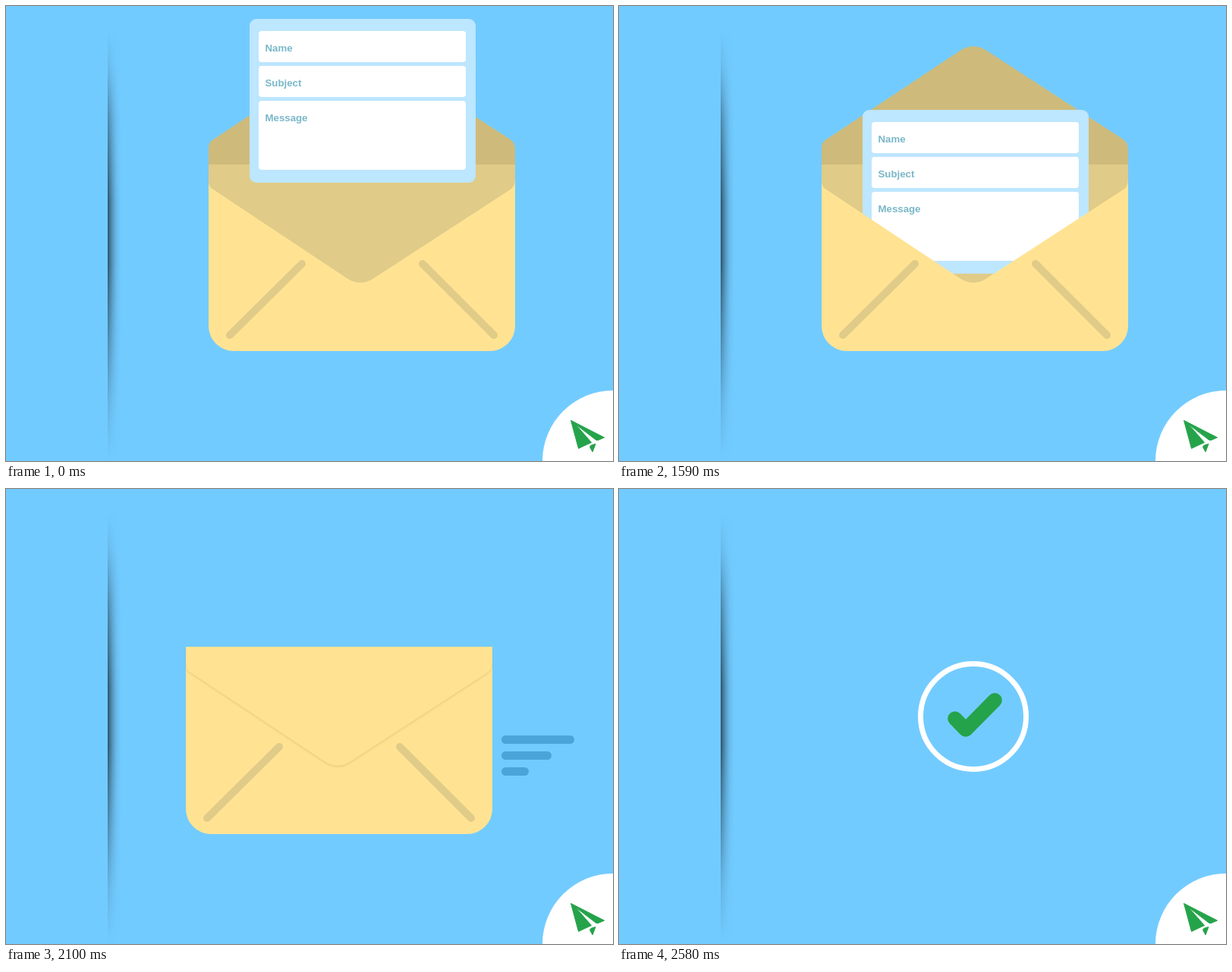
An HTML page that plays this animation: 800 by 600 pixels, repeating every 3080 ms.

```html
<!DOCTYPE html>
<html lang="en">
<head>
<meta charset="utf-8">
<title>Sending a message</title>
<style>
  :root { --sky: #72cbff; --paper: #ffe393; --fold: #e0cb88; --green: #25a34a; }
  html, body { margin: 0; width: 100%; height: 100%; overflow: hidden; background: var(--sky); }
  .stage { position: relative; width: 800px; height: 600px; overflow: hidden; }
  svg { position: absolute; inset: 0; display: block; }

  .anim { animation: 3080ms step-end infinite; }
  .envelope { animation-name: fly; }
  .card { animation-name: drop; }
  .flap { transform-origin: 0 209px; }
  .flap.open { fill: #cebb7b; animation-name: fold; }
  .flap.shut { fill: var(--paper); animation-name: unfold; }
  .streaks { fill: #4ba4d9; animation-name: streak; }
  .done { animation-name: done; }
  .button { animation-name: press; }

  .card text { font: bold 13.25px "Liberation Sans", Arial, sans-serif; fill: #79b7c8; }
  .crease { fill: none; stroke: var(--fold); stroke-width: 10; stroke-linecap: round; }
  .lip { filter: drop-shadow(0 2px 1px rgba(90, 70, 0, .1)); }

  .slot {
    position: absolute; left: 134px; top: 0; width: 20px; height: 600px;
    background: linear-gradient(90deg, rgba(0,0,0,.6), rgba(0,0,0,.42) 3px, rgba(0,0,0,.23) 7px, rgba(0,0,0,.07) 12px, transparent 18px);
    -webkit-mask-image: linear-gradient(transparent 30px, rgba(0,0,0,.14) 80px, rgba(0,0,0,.58) 150px, #000 260px, #000 340px, rgba(0,0,0,.6) 435px, rgba(0,0,0,.2) 525px, transparent 600px);
    mask-image: linear-gradient(transparent 30px, rgba(0,0,0,.14) 80px, rgba(0,0,0,.58) 150px, #000 260px, #000 340px, rgba(0,0,0,.6) 435px, rgba(0,0,0,.2) 525px, transparent 600px);
  }

  @keyframes press {
    0%, 48.7% { fill: #fff; color: var(--green); }
    16.233% { fill: #f3f3f3; color: #1f943f; }
    100% { fill: #fff; color: var(--green); }
  }
  @keyframes drop {
    0% { transform: translateY(0); }
    48.7% { transform: translateY(0); animation-timing-function: steps(12, jump-start); }
    60.389%, 100% { transform: translateY(360px); }
  }
  @keyframes fold {
    0% { transform: scaleY(-1); }
    60.389% { transform: scaleY(-1); animation-timing-function: steps(5, jump-start); }
    65.259%, 100% { transform: scaleY(1); }
  }
  @keyframes unfold {
    0% { transform: scaleY(-1); visibility: hidden; }
    60.389% { transform: scaleY(-1); animation-timing-function: steps(5, jump-start); }
    62.337% { visibility: visible; }
    65.259%, 100% { transform: scaleY(1); visibility: visible; }
  }
  @keyframes streak {
    0% { visibility: hidden; }
    66.233%, 100% { visibility: visible; }
  }
  @keyframes fly {
    0% { transform: translateX(0); }
    68.181% { transform: translateX(-30px); animation-timing-function: steps(8, jump-end); }
    75.974% { transform: translateX(-430px); animation-timing-function: steps(6, jump-end); }
    81.818%, 100% { transform: translateX(-670px); }
  }
  @keyframes done {
    0% { visibility: hidden; }
    83.766%, 100% { visibility: visible; }
  }
</style>
</head>
<body>
<div class="stage">
  <svg width="800" height="600" viewBox="0 0 800 600">
    <defs>
      <path id="flap" d="M267 208V229C267 236 268 239 274 242.5L450 359.5Q467 370 484 359.5L664 242.5Q671 238 671 229V208Z"/>
      <clipPath id="pocket"><rect y="0" width="800" height="440"/></clipPath>
    </defs>

    <g class="anim envelope">
      <use href="#flap" class="anim flap open"/>
      <rect x="267" y="209" width="404" height="160" fill="var(--fold)"/>

      <g clip-path="url(#pocket)">
        <g class="anim card">
          <rect x="321" y="17" width="298" height="216" rx="9" fill="#bde6ff"/>
          <g fill="#fff">
            <rect x="333" y="33" width="273" height="41" rx="4"/>
            <rect x="333" y="79" width="273" height="41" rx="4"/>
            <rect x="333" y="125" width="273" height="91" rx="4"/>
          </g>
          <text x="341.5" y="60">Name</text>
          <text x="341.5" y="106">Subject</text>
          <text x="341.5" y="152">Message</text>
        </g>
      </g>

      <path fill="var(--paper)" d="M267 229C267 236 268 239 274 242.5L450 359.5Q467 370 484 359.5L664 242.5Q671 238 671 229V422A33 33 0 0 1 638 455H300A33 33 0 0 1 267 422Z"/>
      <g class="lip"><use href="#flap" class="anim flap shut"/></g>
      <path class="crease" d="M295 434L390 340M549 340L643 434"/>

      <g class="anim streaks">
        <rect x="683" y="325" width="96" height="11" rx="5.5"/>
        <rect x="683" y="346" width="66" height="11" rx="5.5"/>
        <rect x="683" y="367" width="36" height="11" rx="5.5"/>
      </g>
    </g>

    <rect width="134" height="600" fill="var(--sky)"/>

    <g class="anim done" fill="none">
      <circle cx="467" cy="300" r="69.5" stroke="#fff" stroke-width="7"/>
      <path d="M442.7 302.7L457 317.3L495.3 278.5" stroke="var(--green)" stroke-width="19" stroke-linecap="round" stroke-linejoin="round"/>
    </g>

    <g class="anim button">
      <circle cx="800" cy="600" r="93"/>
      <g fill="currentColor" stroke="currentColor" stroke-linejoin="round">
        <path d="M744.5 546.5L788.5 569L780.5 572.5Q778.5 573 777 571.8L750.5 551.5L771.5 575.5L754.5 583.5Z"/>
        <path d="M769.5 581.5Q770 579.5 772 579L777 577.5L773 588Z"/>
      </g>
    </g>
  </svg>
  <div class="slot"></div>
</div>
</body>
</html>
```
